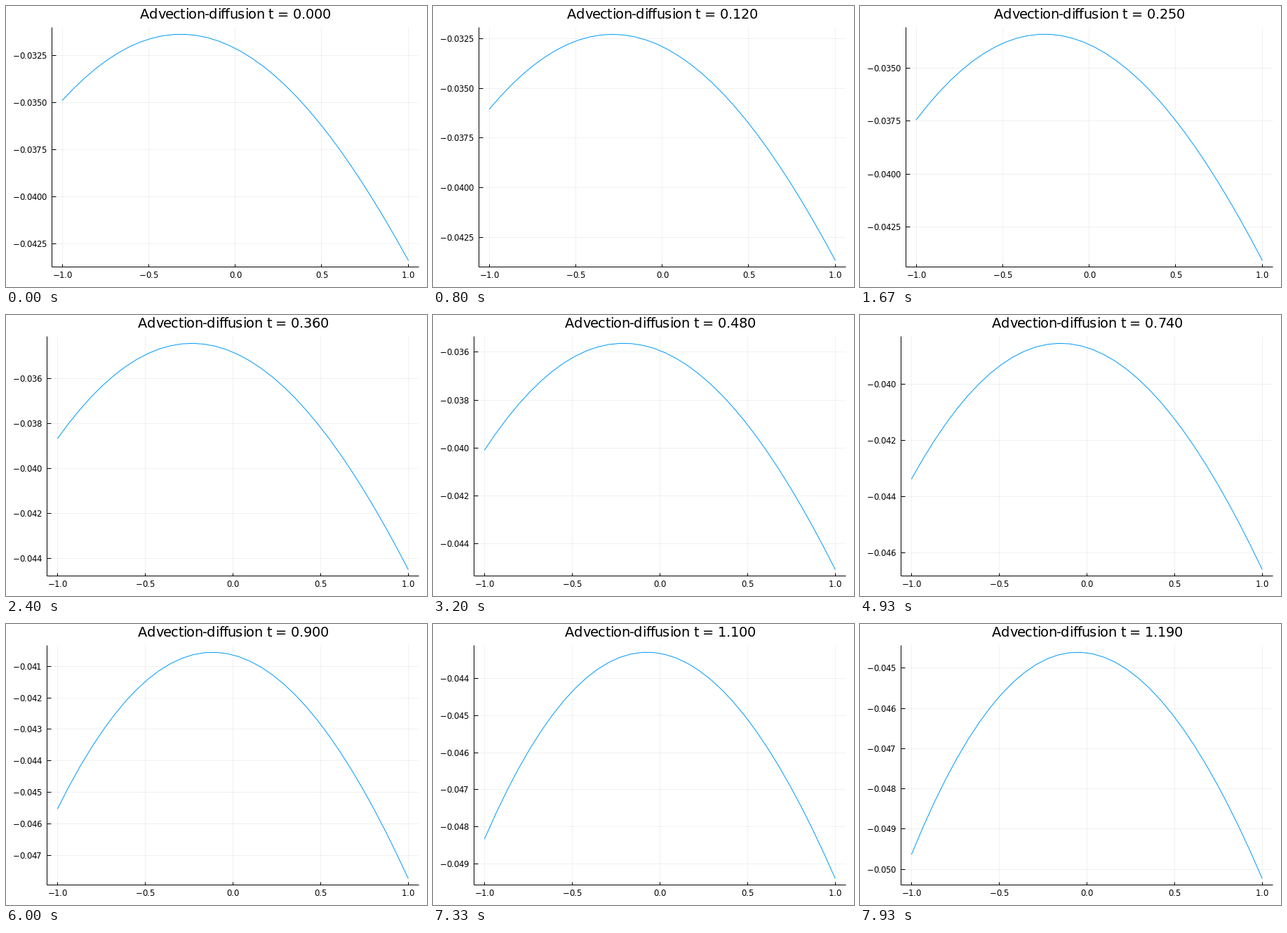
Animation, 600 px wide and 400 px high, one loop 8000 ms. Source, as a matplotlib script:

```python
import math

import numpy as np
import matplotlib.pyplot as plt
from matplotlib.animation import FuncAnimation
from matplotlib.textpath import TextPath

W, H, DPI = 600, 400, 100
TICK_MS, LOOP_MS, STEPS = 20, 8000, 120
TOP, BOTTOM, RIGHT = 30.7, 371.5, 588.0
LABEL_X, LABEL_GAP = 10, 8.5
PAD = 0.03
TICK_PT, TITLE_PT = 8.5, 13.95
BLUE = "#009AFA"
NICENESS = {1: 1.0, 2: 0.7, 2.5: 0.5, 3: 0.2, 5: 0.9}
X = np.linspace(-1, 1, 32)

plt.rcParams["font.family"] = "DejaVu Sans"
fig = plt.figure(figsize=(W / DPI, H / DPI), dpi=DPI, facecolor="white")
ax = fig.add_axes([0, 0, 1, 1])
ax.set_xlim(0, W)
ax.set_ylim(H, 0)
ax.axis("off")

advances = {}
shown = {"step": None}


def advance(char, pt):
    """Whole-pixel advance of one glyph."""
    if (char, pt) not in advances:
        px = pt * DPI / 72
        ends = [TextPath((0, 0), s, size=px).get_extents().x1
                for s in (char + "|", "|")]
        advances[char, pt] = math.floor(ends[0] - ends[1] + 1e-6)
    return advances[char, pt]


def text_width(text, pt):
    return sum(advance(c, pt) for c in text)


def put_text(text, x, baseline, pt):
    for c in text:
        if c != " ":
            ax.text(x, baseline, c, fontsize=pt, ha="left", va="baseline")
        x += advance(c, pt)


def segment(x0, y0, x1, y1, width=0.72, alpha=1.0):
    """Straight line on the pixel row or column that holds it."""
    xs, ys = np.floor([x0, x1]), np.floor([y0, y1])
    ax.plot(xs, ys, color="black", lw=width, alpha=alpha,
            solid_capstyle="butt")


def number(value, digits):
    return f"{value:.{digits}f}".replace("-", "\u2212")


def profile(t):
    """Concentration in thousandths: a quartic set by its ends and peak."""
    left = -34.87 - 9.50 * t - 3.07 * t**2 + 0.53 * t**3
    right = -43.36 - 2.02 * t - 3.15 * t**2
    peak = -31.36 - 7.38 * t - 3.15 * t**2
    c3 = 0.48 - 0.17 * t
    c4 = 0.32 - 0.20 * t
    c1 = (right - left) / 2 - c3
    mean = (left + right) / 2
    top = 0
    for _ in range(4):
        rise = peak - mean + c4 - c3 * top**3 - c4 * top**4
        q = (rise + math.sqrt(rise**2 - c1**2)) / 2
        top = c1 / (2 * q)
    return mean + q - c4 + c1 * X - q * X**2 + c3 * X**3 + c4 * X**4


def pick_ticks(lo, hi):
    """Best tick step by count, coverage and niceness."""
    best = None
    for step, nice in NICENESS.items():
        first, last = math.ceil(lo / step), math.floor(hi / step)
        n = last - first + 1
        if not 4 <= n <= 8:
            continue
        cover = 1.5 * (hi - lo) / ((n - 1) * step)
        score = (1 - abs(n - 5) / 5) / 4 + cover / 3 + nice / 4
        key = (round(score, 6), -n)
        if best is None or key > best[0]:
            best = key, step, [k * step for k in range(first, last + 1)]
    return best[1], best[2]


def plot(t):
    for artist in [*ax.lines, *ax.texts]:
        artist.remove()

    values = profile(t)
    margin = PAD * np.ptp(values)
    lo, hi = values.min() - margin, values.max() + margin
    step, ticks = pick_ticks(lo, hi)
    digits = 4 if step == 2.5 else 3
    labels = [number(v / 1000, digits) for v in ticks]
    left = LABEL_X + text_width(labels[0], TICK_PT) + LABEL_GAP

    def px(x):
        span = 2 * (1 + 2 * PAD)
        return left + (RIGHT - left) * (x + span / 2) / span

    def py(v):
        return BOTTOM - (BOTTOM - TOP) * (v - lo) / (hi - lo)

    x_ticks = np.linspace(-1, 1, 5)
    for x in x_ticks:
        segment(px(x), TOP, px(x), BOTTOM, 0.5, 0.08)
    for v in ticks:
        segment(left, py(v), RIGHT, py(v), 0.5, 0.08)

    segment(left, BOTTOM, RIGHT, BOTTOM)
    segment(left, TOP, left, BOTTOM)
    for x in x_ticks:
        segment(px(x), BOTTOM, px(x), BOTTOM - 0.012 * (BOTTOM - TOP))
        label = number(x, 1)
        start = math.floor(px(x) - text_width(label, TICK_PT) / 2)
        put_text(label, start, 387, TICK_PT)
    for v, label in zip(ticks, labels):
        segment(left, py(v), left + 0.012 * (RIGHT - left), py(v))
        put_text(label, LABEL_X, math.floor(py(v)) + 5, TICK_PT)

    ax.plot(px(X), py(values), color=BLUE, lw=0.72)
    title = f"Advection-diffusion t = {t:.3f}"
    start = math.ceil((left + RIGHT - text_width(title, TITLE_PT)) / 2)
    put_text(title, start, 18, TITLE_PT)


def reset():
    shown["step"] = None
    return []


def draw(i):
    # Steps last 60 or 70 ms, so the clock runs finer than the steps.
    step = int((i * TICK_MS + 15) * STEPS / LOOP_MS)
    if step != shown["step"]:
        plot(step / 100)
        shown["step"] = step
    return []


anim = FuncAnimation(fig, draw, frames=LOOP_MS // TICK_MS, interval=TICK_MS,
                     init_func=reset, repeat=True, repeat_delay=0,
                     blit=False)
plt.show()
```
